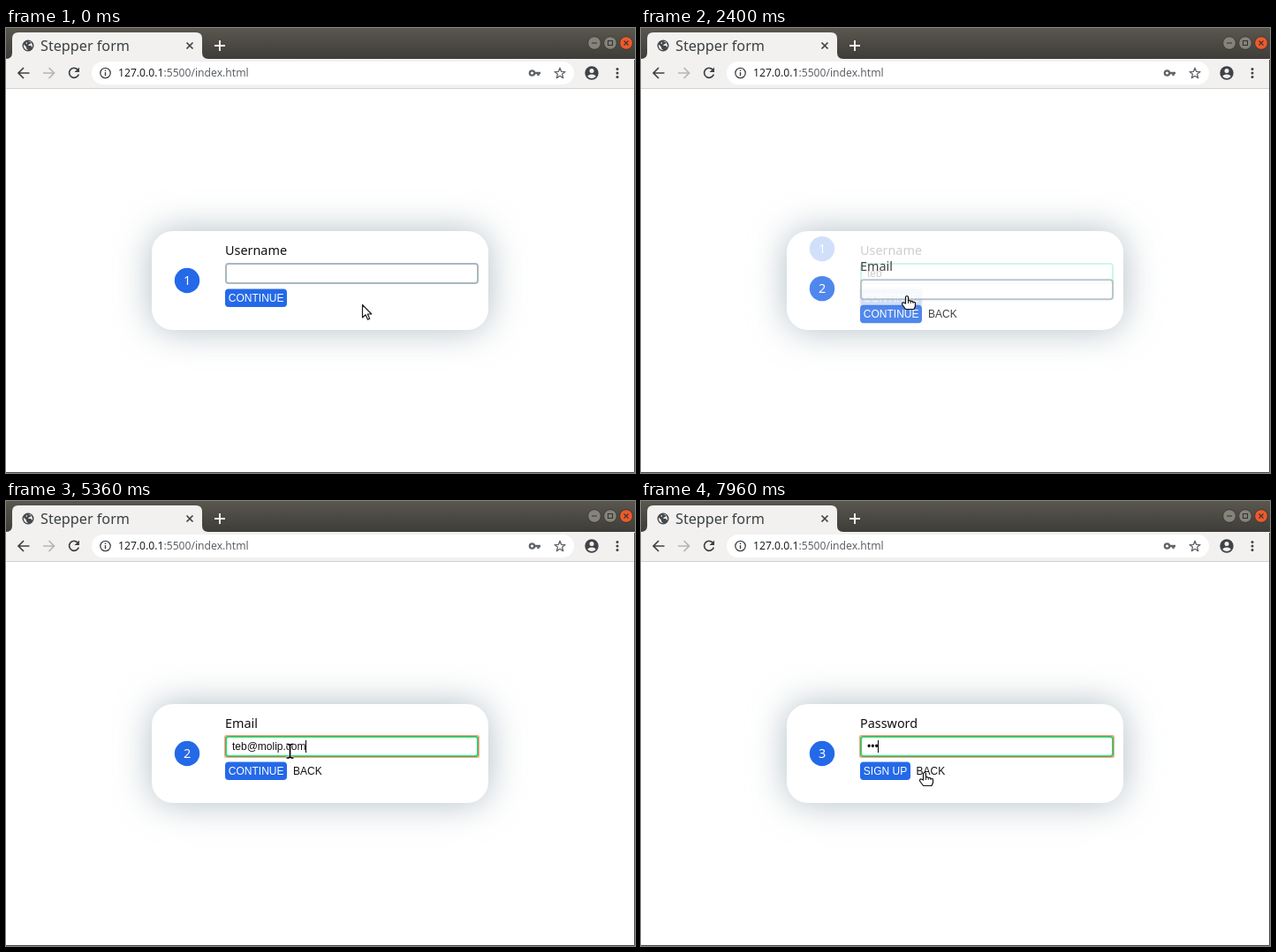
Animation, 712 px wide and 504 px high, one loop 8 s. Source, as an HTML page:

```html
<!DOCTYPE html>
<html lang="en">
<head>
<meta charset="utf-8">
<title>Stepper form</title>
<style>
html, body { margin: 0; width: 100%; height: 100%; overflow: hidden; background: #fff; }
svg { display: block; width: 712px; height: 504px; }
.ui { font-family: "Noto Sans", sans-serif; }
.form { font: 12px "Liberation Sans", Arial, sans-serif; }
.line { fill: none; stroke: #3f4246; stroke-width: 1.7; }
text { white-space: pre; }
</style>
</head>
<body>
<svg id="stage" viewBox="0 0 712 504">
  <defs>
    <linearGradient id="bar" x2="0" y2="1">
      <stop offset="0" stop-color="#59574e"/><stop offset="1" stop-color="#3d3c38"/>
    </linearGradient>
    <filter id="blur" x="-30%" y="-80%" width="160%" height="260%">
      <feGaussianBlur stdDeviation="20"/>
    </filter>
  </defs>
  <rect width="712" height="504" fill="#fff"/>

  <rect width="712" height="36" fill="url(#bar)"/>
  <path d="M0 35Q7 35 7 28V12Q7 5 14 5H215Q222 5 222 12V28Q222 35 229 35Z" fill="#f2f1f0"/>
  <rect y="35" width="712" height="33" fill="#f2f1f0"/>
  <rect y="68" width="712" height="1" fill="#d3d2d1"/>
  <circle cx="25" cy="20" r="6.5" fill="#45484c"/>
  <path d="M20 18.5L23 21.5V23L25 25Q21 25 20 21ZM25 15H28Q29 18 26 18.5L25 20H28L30 22Q30 16.500 27 15.500ZM22 17L24 16V18Z" fill="#f2f1f0"/>
  <text class="ui" x="39" y="26" font-size="16.2" fill="#3c4043">Stepper form</text>
  <path class="line" d="M204.500 16.500L211.500 23.500M211.500 16.500L204.500 23.500"/>
  <path d="M236 20H248M242 14V26" stroke="#f4f3f1" stroke-width="1.9"/>
  <g stroke="#34332f" stroke-width=".8">
    <circle cx="666" cy="17" r="7.300" fill="#85837a"/>
    <circle cx="684" cy="17" r="7.300" fill="#85837a"/>
    <circle cx="702" cy="17" r="7.300" fill="#ee5a2c"/>
    <path d="M663 17H669M681.500 14.500H686.500V19.500H681.500ZM699.500 14.500L704.500 19.500M704.500 14.500L699.500 19.500" fill="none" stroke-width="1.1"/>
  </g>

  <path class="line" d="M26.500 51H14.500M20 45L14 51L20 57"/>
  <path class="line" d="M42 51H54M48.500 45L54.500 51L48.500 57" style="stroke:#b4b5b5"/>
  <path class="line" d="M81.500 47.500A5.500 5.500 0 1 0 82.300 52.500"/>
  <path d="M83 44.500V50H77.500Z" fill="#3f4246"/>
  <rect x="97" y="38" width="546" height="26" rx="13" fill="#fff"/>
  <circle class="line" cx="112.500" cy="51" r="5.700" style="stroke-width:1.300"/>
  <path d="M112.500 50V54.200M112.500 47.500V49" stroke="#3f4246" stroke-width="1.4"/>
  <text class="ui" x="127" y="55.300" font-size="12.15" fill="#202124">127.0.0.1<tspan fill="#5f6368">:5500/index.html</tspan></text>
  <circle cx="595.500" cy="51" r="2.700" fill="none" stroke="#5f6368" stroke-width="2.200"/>
  <path d="M598 51H605M602.500 51V54" fill="none" stroke="#5f6368" stroke-width="2.400"/>
  <path id="star" fill="none" stroke="#5f6368" stroke-width="1.300" stroke-linejoin="round"/>
  <circle cx="663" cy="51" r="7.700" fill="#3f4246"/>
  <circle cx="663" cy="48.500" r="2.500" fill="#f2f1f0"/>
  <path d="M658.300 55Q659 52.500 663 52.500T667.700 55Q663 59 658.300 55Z" fill="#f2f1f0"/>
  <g fill="#3f4246"><circle cx="692" cy="46.500" r="1.500"/><circle cx="692" cy="51" r="1.500"/><circle cx="692" cy="55.500" r="1.500"/></g>
  <path d="M711.500 36V503.500H0" fill="none" stroke="#4a4945"/>

  <rect x="165" y="230" width="381" height="112" rx="24" fill="#b0bec5" filter="url(#blur)"/>
  <rect x="165" y="230" width="381" height="112" rx="24" fill="#fff"/>
  <g id="steps"></g>

  <g id="cursor" stroke-linejoin="round">
    <path id="arrow" d="M.5.5V15L4 11.800L6.500 17.300L8.700 16.300L6.300 11H10.800Z" fill="#fff" stroke="#1c1c1c" stroke-width="1.200"/>
    <g id="beam" fill="none">
      <path d="M-4-7.500H-1.500L.5-6.500L2.500-7.500H4.500M.5-6.500V7M-4 8H-1.500L.5 7L2.500 8H4.500" stroke="#fff" stroke-width="3"/>
      <path d="M-3.500-7.500H-1.500L.5-6.500L2.500-7.500H4.500M.5-6.500V7M-3.500 8H-1.500L.5 7L2.500 8H4.500" stroke="#000" stroke-width="1.700"/>
    </g>
    <g id="hand">
      <path d="M-1.500 9V1.500Q0-.5 1.500 1.500V6Q3 5 4.200 6.500Q6 5.800 7 7.300Q9.500 7 9.500 9V12L8 15.500H-1.500L-5.500 10Q-5.500 7.500-3.500 8Z" fill="#fff" stroke="#111" stroke-width="1.200"/>
      <path d="M1.500 6V9M4.200 6.500V9M7 7.300V9" stroke="#111" stroke-width=".9"/>
    </g>
  </g>
</svg>
<script>
const $ = id => document.getElementById(id);
const LOOP = 8000, TICK = 40, SLIDE = 400, ROW = 90, TOP = 241;
const BLUE = "#2469e8", GREY = "#a9b8c0", GREEN = "#0fe57c";

// keys: time of each typed character; caret: visible span; press: button focus; leave: slide start
const steps = [
  { label: "Username", button: "CONTINUE", width: 70, value: "teb", keys: [840, 1000, 1160],
    caret: [400, 1680], press: 2160, enter: -SLIDE, leave: 2235, valid: n => n > 0 },
  { label: "Email", button: "CONTINUE", width: 70, back: 325, value: "teb@molip.com",
    keys: [3640, 3760, 3880, 4040, 4400, 4560, 4640, 4720, 4920, 5080, 5160, 5240, 5360],
    caret: [3160, 5960], press: 6680, enter: 2235, leave: 6745, valid: n => n > 4 && n !== 10 },
  { label: "Password", button: "SIGN UP", width: 57, back: 311.5, value: "•••", keys: [7760, 7840, 7920],
    caret: [7560, LOOP], press: LOOP, enter: 6745, leave: LOOP, valid: n => n > 0 }
];

// time, x, y, shape
const path = [
  [0, 403, 313, "arrow"], [280, 372, 291, "arrow"], [320, 368, 284, "beam"], [1680, 368, 284, "beam"],
  [1760, 345, 294, "arrow"], [1920, 310, 303, "hand"], [2000, 301, 303, "hand"], [2960, 301, 303, "hand"],
  [3000, 516, 312, "arrow"], [3040, 321, 283, "beam"], [5960, 321, 283, "beam"], [6000, 312, 294, "arrow"],
  [6200, 268, 323, "arrow"], [6440, 268, 323, "arrow"], [6520, 271, 312, "hand"], [6600, 273, 305, "hand"],
  [6800, 273, 305, "beam"], [6880, 273, 305, "beam"], [6920, 275, 304, "hand"], [7080, 304, 292, "beam"],
  [7240, 323, 285, "beam"], [7320, 323, 285, "beam"], [7360, 323, 286, "beam"], [7880, 323, 286, "beam"],
  [7920, 322, 293, "arrow"], [7960, 321, 307, "hand"]
];

function buildStep(s, i) {
  const g = document.createElementNS("http://www.w3.org/2000/svg", "g");
  g.innerHTML = `
    <g class="badge"><circle cx="205" r="14.200" fill="${BLUE}"/>
      <text class="ui" x="205" y="5.300" font-size="14.4" fill="#fff" text-anchor="middle">${i + 1}</text></g>
    <g class="body">
      <text class="ui" x="248" y="257" font-size="14.4" fill="#111">${s.label}</text>
      <rect class="box" x="249" y="267" width="285" height="22" rx="3" fill="#fff" stroke-width="2"/>
      <rect class="ring" x="248" y="266" width="287" height="24" rx="1.500" fill="none" stroke="#e8642f" stroke-opacity=".55" stroke-width="2"/>
      <text class="form value" x="256" y="282.300" fill="#111"></text>
      <rect class="caret" y="271" width="1" height="14" fill="#000"/>
      <rect x="248" y="295.500" width="${s.width}" height="20.500" rx="4" fill="${BLUE}"/>
      <rect class="focus" x="248" y="295.500" width="${s.width}" height="20.500" rx="2" fill="none" stroke="#f0a078" stroke-width="1.500"/>
      <text class="form" x="251.800" y="310.200" fill="#fff">${s.button}</text>
      ${s.back ? `<text class="form" x="${s.back}" y="310.200" fill="#111">BACK</text>` : ""}
    </g>`;
  $("steps").append(g);
  s.node = g;
  for (const name of ["badge", "body", "box", "ring", "value", "caret", "focus"])
    s[name + "El"] = g.querySelector("." + name);
}

const show = (el, on) => el.setAttribute("display", on ? "inline" : "none");
const moveY = (el, y) => el.setAttribute("transform", `translate(0 ${y})`);
const cubicOut = x => 1 - (1 - Math.min(1, Math.max(0, x))) ** 3;

function drawStep(s, t) {
  const inn = cubicOut((t - s.enter) / SLIDE), out = cubicOut((t - s.leave) / SLIDE);
  const alive = inn > 0 && out < 1;
  show(s.node, alive);
  if (!alive) return;
  const shift = ROW * (1 - inn), height = ROW * (inn - out);
  s.node.setAttribute("opacity", inn * (1 - out));
  moveY(s.badgeEl, TOP + shift + height / 2);
  moveY(s.bodyEl, shift);

  const count = s.keys.filter(k => k <= t).length, ok = s.valid(count);
  s.valueEl.textContent = s.value.slice(0, count);
  s.boxEl.setAttribute("stroke", ok ? GREEN : GREY);
  show(s.ringEl, ok && t < s.press);
  show(s.focusEl, t >= s.press);
  const caret = t >= s.caret[0] && t < s.caret[1];
  show(s.caretEl, caret);
  if (caret) s.caretEl.setAttribute("x", Math.floor(256 + (count ? s.valueEl.getComputedTextLength() : 0)));
}

function drawCursor(t) {
  const i = path.findLastIndex(p => p[0] <= t);
  const [t0, x0, y0, shape] = path[i], [t1, x1, y1] = path[i + 1] || [LOOP, x0, y0];
  const k = (t - t0) / (t1 - t0), mix = (a, b) => Math.round(a + (b - a) * k);
  $("cursor").setAttribute("transform", `translate(${mix(x0, x1)} ${mix(y0, y1)})`);
  for (const id of ["arrow", "beam", "hand"]) show($(id), id === shape);
}

function render(ms) {
  const t = Math.floor(ms % LOOP / TICK) * TICK;
  steps.forEach(s => drawStep(s, t));
  drawCursor(t);
}

const starPoint = (_, i) => {
  const r = i % 2 ? 2.700 : 6.300, a = (i / 5 - .5) * Math.PI;
  return `${627 + r * Math.cos(a)} ${51.500 + r * Math.sin(a)}`;
};
$("star").setAttribute("d", "M" + Array.from({ length: 10 }, starPoint).join("L") + "Z");

steps.forEach(buildStep);
const start = performance.now();
(function loop() {
  render(performance.now() - start);
  requestAnimationFrame(loop);
})();
</script>
</body>
</html>
```
